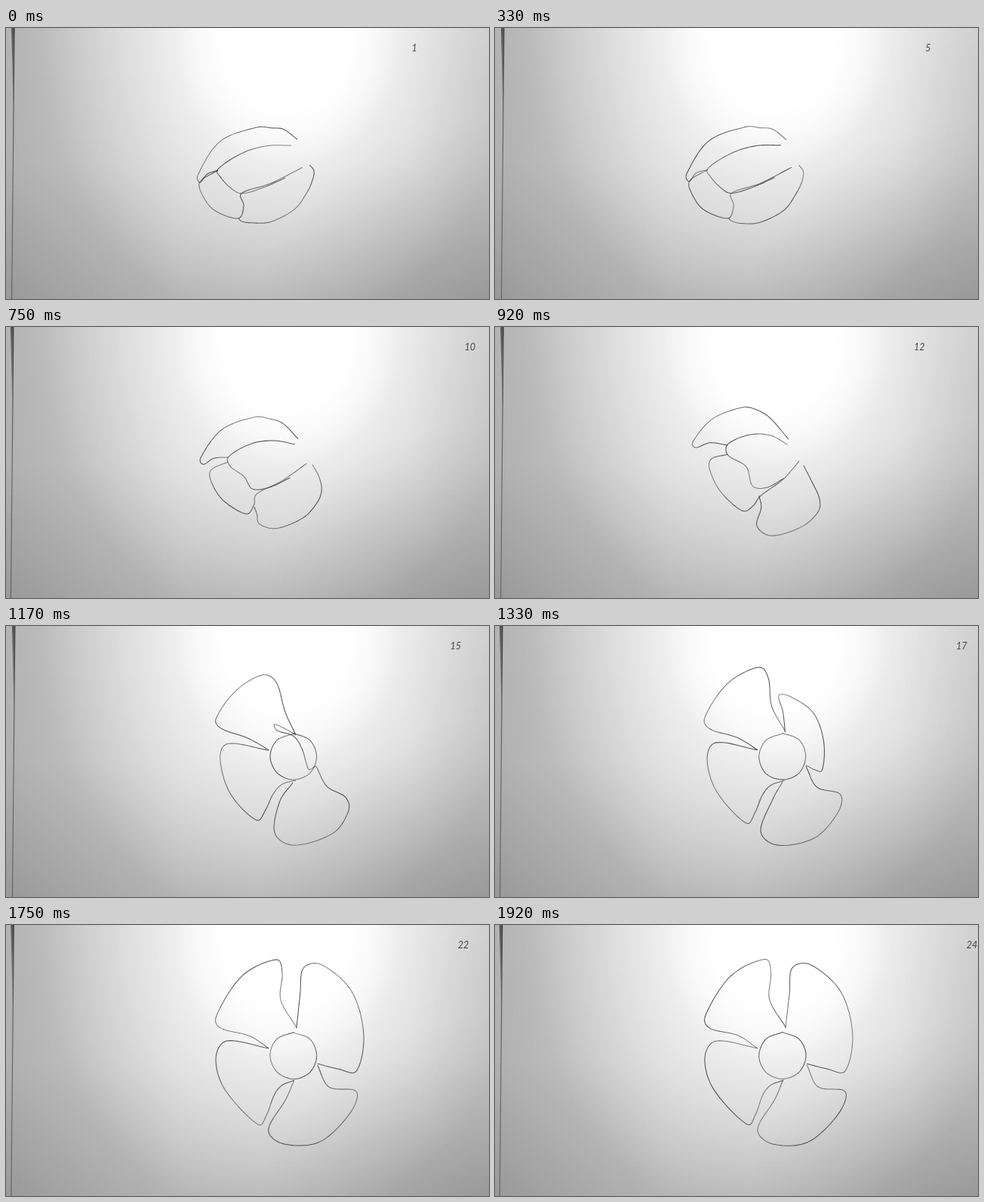
An HTML page with a canvas for the animation above (2010 ms loop, 640 by 360 pixels).

```html
<!DOCTYPE html>
<html lang="en">
<head>
<meta charset="utf-8">
<title>Pencil flower</title>
<style>
html, body { margin: 0; width: 100%; height: 100%; overflow: hidden; background: #ccc; }
canvas { display: block; width: 640px; height: 360px; }
</style>
</head>
<body>
<canvas id="stage" width="640" height="360"></canvas>
<script>
const ctx = document.getElementById('stage').getContext('2d');
const W = 640, H = 360, LOOP = 2010, COUNT = 24, PER_SECOND = 12;

// Drawing index of each pose, and the easing power on the way to the next
const poses = [
  { at: 0, pow: 3.5 },   // ball
  { at: 11, pow: 1 },    // bud
  { at: 14, pow: 0.7 },  // half open
  { at: 19, pow: 1 }     // flower
];

// Key points of each stroke: ball, bud, half open, flower
const strokes = {
  top: [
    '386 148 368 135 352 133 331 132 283 151 254 195 257 205 266 194 281 189',
    '389 149 365 121 346 110 327 107 288 122 262 153 266 160 285 154 308 157',
    '384 144 370 114 358 75 340 65 304 86 278 123 285 136 320 149 348 165',
    '385 136 364 99 366 64 358 46 313 67 279 120 284 137 322 147 348 164'
  ].map(points),
  left: [
    '281 189 257 204 260 221 276 242 308 253 315 236 312 220 350 207 393 185',
    '308 169 287 175 284 188 299 218 328 244 342 237 352 224 382 202 403 178',
    '348 165 294 156 284 176 297 222 332 258 344 244 354 223 366 210 384 205',
    '348 164 293 154 278 177 290 218 334 265 345 252 355 226 365 213 382 206'
  ].map(points),
  hub: [
    points('378 156 345 157 312 167 281 188 285 199 297 212 312 220 340 212 370 199'),
    points('388 156 365 144 337 143 309 156 309 170 333 185 341 211 360 213 383 201'),
    ring(381, 173.5, 31),
    ring(381, 173.5, 31)
  ],
  low: [
    '308 253 312 257 325 259 350 258 382 241 398 219 406 203 408 190 402 182',
    '350 224 353 240 347 264 366 277 406 266 428 246 430 228 420 205 409 184',
    '380 208 363 233 356 275 382 291 433 275 454 245 450 227 425 213 411 187',
    '382 206 371 231 348 272 368 291 415 288 455 251 464 221 428 215 413 186'
  ].map(points),
  right: [
    '',
    '384 145 371 137 356 131 360 139 381 146 392 163 400 189 404 190 411 186',
    '384 145 371 137 356 131 360 139 381 146 392 163 400 189 404 190 411 186',
    '385 137 390 92 394 57 418 53 458 88 474 145 464 194 440 191 413 184'
  ].map(points)
};

// Page numbers walk to the right: first index, start x, step
const rows = [[0, 541, 8.2], [10, 551, 11.2], [17, 554, 13]];

function points(text) {
  const v = text.split(' ').map(Number);
  return v.slice(0, v.length >> 1).map((_, i) => [v[2 * i], v[2 * i + 1]]);
}

function ring(x, y, r, n = 8) {
  return Array.from({ length: n + 1 }, (_, i) => {
    const a = i / n * 2 * Math.PI;
    return [x - r * Math.sin(a), y - r * Math.cos(a)];
  });
}

const mix = (a, b, u) => a.map((v, i) => v + (b[i] - v) * u);

function rand(seed) {
  const s = Math.sin(seed * 127.1 + 11.7) * 43758.5453;
  return s - Math.floor(s);
}

// Centripetal spline through the points
function spline(pts, steps = 10) {
  const n = pts.length, t = [0], out = [pts[0]];
  for (let i = 1; i < n; i++) {
    t.push(t[i - 1] + Math.sqrt(Math.hypot(pts[i][0] - pts[i - 1][0], pts[i][1] - pts[i - 1][1])));
  }
  const slope = (i, k) => {
    const a = Math.max(0, i - 1), b = Math.min(n - 1, i + 1);
    return (pts[b][k] - pts[a][k]) / (t[b] - t[a]);
  };
  for (let i = 0; i < n - 1; i++) {
    const d = t[i + 1] - t[i];
    for (let j = 1; j <= steps; j++) {
      const u = j / steps, v = 1 - u;
      out.push([0, 1].map(k =>
        pts[i][k] * (1 + 2 * u) * v * v + slope(i, k) * d * u * v * v +
        pts[i + 1][k] * u * u * (3 - 2 * u) - slope(i + 1, k) * d * u * u * v));
    }
  }
  return out;
}

// Pencil pressure varies along the stroke
function pencil(pts, seed) {
  const step = 4;
  ctx.lineWidth = 1.05;
  for (let i = 0; i < pts.length - 1; i += step) {
    const press = 0.72 + 0.14 * Math.sin(i * 0.11 + seed * 2.3);
    ctx.strokeStyle = `rgba(50,50,50,${press})`;
    ctx.beginPath();
    pts.slice(i, i + step + 1).forEach(p => ctx.lineTo(p[0], p[1]));
    ctx.stroke();
  }
}

function fade(x, y, color, stops) {
  const g = ctx.createLinearGradient(0, 0, x, y);
  stops.forEach(([at, a]) => g.addColorStop(at, `rgba(${color},${a})`));
  return g;
}

function glow(x, y, rx, ry, color, stops) {
  ctx.save();
  ctx.translate(x, y);
  ctx.scale(rx, ry);
  const g = ctx.createRadialGradient(0, 0, 0, 0, 0, 1);
  stops.forEach(([at, a]) => g.addColorStop(at, `rgba(${color},${a})`));
  ctx.fillStyle = g;
  ctx.fillRect(-x / rx, -y / ry, W / rx, H / ry);
  ctx.restore();
}

function paper(index) {
  ctx.fillStyle = '#d3d3d3';
  ctx.fillRect(0, 0, W, H);
  ctx.fillStyle = fade(0, H, '0,0,0', [[0, 0], [0.5, 0.02], [1, 0.15]]);
  ctx.fillRect(0, 0, W, H);
  ctx.fillStyle = fade(230, 0, '0,0,0', [[0, 0.15], [0.5, 0.07], [1, 0]]);
  ctx.fillRect(0, 0, W, H);
  glow(365, 10, 320, 390, '255,255,255', [[0, 1], [0.25, 0.92], [0.5, 0.55], [0.75, 0.26], [1, 0]]);
  glow(375, 25, 150, 160, '255,255,255', [[0, 1], [0.5, 0.9], [1, 0]]);
  glow(660, 380, 330, 260, '0,0,0', [[0, 0.17], [0.5, 0.07], [1, 0]]);
  glow(660, 100, 130, 260, '0,0,0', [[0, 0.07], [1, 0]]);

  // Left edge of the sheet, with its shadow near the top
  const top = 9 + 3 * rand(index), low = top - 3.5;
  ctx.beginPath();
  ctx.moveTo(top, 0);
  ctx.lineTo(top - 4, 0);
  ctx.lineTo(top - 1.5, 110);
  ctx.fillStyle = fade(0, 110, '20,20,20', [[0, 0.6], [1, 0.2]]);
  ctx.fill();
  ctx.beginPath();
  ctx.moveTo(top, 0);
  ctx.quadraticCurveTo(top - 1.5, H * 0.3, low, H);
  ctx.lineWidth = 1.1;
  ctx.strokeStyle = fade(0, H, '40,40,40', [[0, 0.8], [0.5, 0.6], [1, 0.5]]);
  ctx.stroke();
}

function label(index) {
  const [first, x, step] = rows.filter(r => r[0] <= index).pop();
  ctx.font = 'italic 12.5px Lato, sans-serif';
  ctx.textAlign = 'center';
  ctx.textBaseline = 'middle';
  ctx.fillStyle = 'rgba(45,45,45,.85)';
  ctx.fillText(index + 1, x + step * (index - first), 27.5);
}

function draw(index) {
  let k = poses.length - 1;
  while (poses[k].at > index) k--;
  const from = poses[k], next = Math.min(k + 1, poses.length - 1);
  const u = next === k ? 0 : Math.pow((index - from.at) / (poses[next].at - from.at), from.pow);

  paper(index);
  Object.values(strokes).forEach((shape, n) => {
    if (shape === strokes.right && index < 13) return;
    const shake = i => (rand(index * 97 + n * 31 + i) - 0.5) * 0.8;
    const pts = shape[k].map((p, i) => mix(p, shape[next][i], u).map((v, j) => v + shake(2 * i + j)));
    pencil(spline(pts), n + index);
  });
  label(index);
}

let shown = -1, start = null;
function tick(now) {
  if (start === null) start = now;
  const t = (now - start) % LOOP;
  let index = COUNT - 1;
  while (Math.round(index * 100 / PER_SECOND) * 10 > t) index--;
  if (index !== shown) draw(shown = index);
  requestAnimationFrame(tick);
}
ctx.lineJoin = 'round';
draw(0);
requestAnimationFrame(tick);
</script>
</body>
</html>
```
